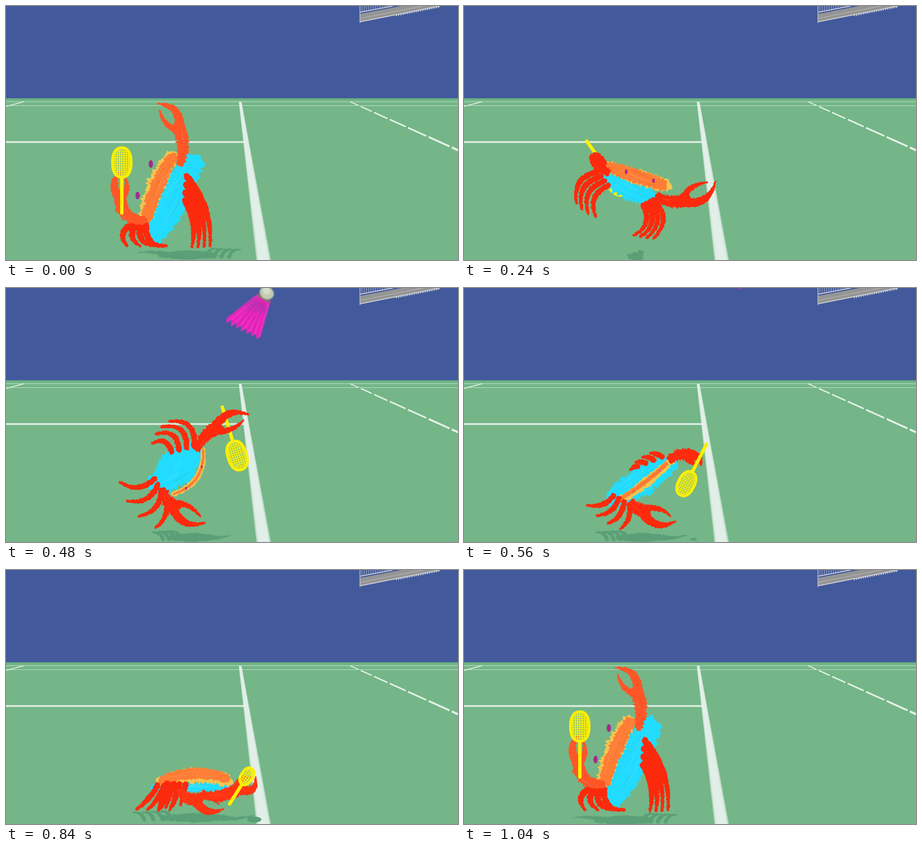
An HTML page with a canvas for the animation above (1080 ms loop, 800x450 px).

```html
<!DOCTYPE html>
<html lang="en">
<head>
<meta charset="utf-8">
<title>Crab smash</title>
<style>
  html, body { margin: 0; width: 100%; height: 100%; overflow: hidden; background: #74b687; }
  canvas { display: block; width: 800px; height: 450px; }
</style>
</head>
<body>
<canvas id="stage" width="800" height="450"></canvas>
<script>
const ctx = document.getElementById('stage').getContext('2d');
const LOOP = 1080, STEP = 40, HIT = 440, RAD = Math.PI / 180;
const RED = '#fc2a0d', YELLOW = '#fff000', SHADE = '#5a9f77', CHALK = '#e4f1e8';

// Key poses.
// left, right: first root, last root, first foot, last foot of four legs
// hand, claw: shoulder, wrist, tip;  belly, shell: both ends;  grip: middle of the racket
// bend: left legs, right legs, arm, pincer, shell
// skin: belly width, rim width, shell width, shell shift, shell trim, eye offset, eye size, tone
// bat: angle, size;  shade: x, half span, y, side of the fronds
const POSES = [
  { t: 0, order: 'front',
    left: [222, 387, 248, 389, 214, 425, 284, 425], right: [317, 345, 320, 302, 329, 427, 361, 425],
    hand: [243, 380, 202, 338, 206, 292], claw: [309, 278, 305, 215, 269, 173],
    belly: [329, 280, 264, 400], shell: [290, 269, 247, 374], grip: [205, 322],
    bend: [.28, -.1, -.25, -.22, .04], skin: [62, 33, 26, -3, 0, 24, 1, 1],
    bat: [-90, 28], shade: [324, 91, 441, 1] },
  { t: 160, order: 'back',
    left: [225, 350, 253, 352, 228, 420, 265, 425], right: [325, 338, 342, 325, 333, 416, 363, 411],
    hand: [240, 340, 221, 322, 253, 264], claw: [336, 308, 388, 281, 417, 220],
    belly: [346, 317, 232, 350], shell: [338, 277, 242, 333], grip: [240, 295],
    bend: [.23, -.32, -.2, -.2, 0], skin: [36, 40, 42, 0, .12, 3, 1, 0],
    bat: [-11, 27], shade: [275, 83, 442, 1] },
  { t: 360, order: 'middle',
    left: [306, 240, 286, 270, 242, 245, 247, 297], right: [287, 338, 318, 342, 262, 385, 294, 425],
    hand: [317, 254, 312, 200, 251, 179], claw: [312, 354, 333, 380, 395, 398],
    belly: [308, 332, 308, 268], shell: [328, 343, 331, 254], grip: [286, 188],
    bend: [.25, -.15, .08, .2, 0], skin: [57, 10, 0, 0, 0, 0, 0, 0],
    bat: [152, 29], shade: [344, 54, 447, -1] },
  { t: 480, order: 'middle',
    left: [333, 280, 293, 290, 290, 236, 259, 275], right: [263, 338, 280, 370, 202, 344, 265, 424],
    hand: [340, 283, 373, 248, 429, 224], claw: [280, 362, 297, 387, 352, 416],
    belly: [274, 345, 328, 296], shell: [297, 365, 349, 287], grip: [396, 254],
    bend: [.3, -.2, -.1, -.2, .19], skin: [68, 11, 5, 0, 0, 0, .4, 0],
    bat: [433, 28], shade: [328, 70, 442, -1] },
  { t: 640, order: 'front',
    left: [368, 318, 320, 340, 366, 352, 327, 370], right: [265, 395, 305, 397, 233, 425, 291, 428],
    hand: [392, 323, 424, 347, 402, 400], claw: [318, 398, 343, 406, 401, 411],
    belly: [262, 392, 392, 333], shell: [259, 380, 396, 313], grip: [422, 368],
    bend: [-.1, -.12, -.2, -.18, -.12], skin: [38, 23, 12, -4, -.3, 0, 0, 0],
    bat: [521, 21], shade: [299, 91, 442, -1] },
  { t: 840, order: 'front',
    left: [318, 380, 285, 378, 309, 416, 270, 425], right: [268, 382, 303, 382, 231, 424, 290, 425],
    hand: [350, 398, 413, 386, 442, 367], claw: [310, 395, 338, 407, 385, 423],
    belly: [263, 385, 400, 384], shell: [277, 376, 390, 373], grip: [411, 390],
    bend: [0, -.06, .12, .35, -.09], skin: [18, 27, 20, -4, 0, 0, 0, .25],
    bat: [662, 18], shade: [332, 107, 439, -1] }
];
POSES.push({ ...POSES[0], t: 1040, bat: [630, 28], shade: [285, 92, 443, 1] });
const LIMBS = ['left', 'right', 'hand', 'claw', 'belly', 'shell', 'grip'];
const TRAITS = ['bend', 'skin', 'bat', 'shade'];

const lerp = (a, b, u) => a + (b - a) * u;
const mix = (a, b, u) => a.map((v, i) => lerp(v, b[i], u));

let seed = 1;
const rnd = () => {
  seed = (seed * 16807) % 2147483647;
  return seed / 2147483647;
};

// The body turns clockwise all the time, about the middle of its shoulders
POSES.forEach((p, i) => {
  const [hx, hy] = p.hand, [cx, cy] = p.claw;
  p.mid = [(hx + cx) / 2, (hy + cy) / 2];
  p.turn = Math.atan2(hy - cy, hx - cx);
  while (i && p.turn < POSES[i - 1].turn) p.turn += Math.PI * 2;
});

function rotate(list, ang) {
  const c = Math.cos(ang), s = Math.sin(ang), out = [];
  for (let i = 0; i < list.length; i += 2) {
    out.push(list[i] * c - list[i + 1] * s, list[i] * s + list[i + 1] * c);
  }
  return out;
}
const shift = (list, x, y) => list.map((v, i) => v + (i % 2 ? y : x));
const local = (p, key) => rotate(shift(p[key], -p.mid[0], -p.mid[1]), -p.turn);

function poseAt(t) {
  let k = 0;
  while (k < POSES.length - 2 && t >= POSES[k + 1].t) k++;
  const a = POSES[k], b = POSES[k + 1], u = Math.min(1, (t - a.t) / (b.t - a.t));
  const mid = mix(a.mid, b.mid, u), turn = lerp(a.turn, b.turn, u);
  const pose = { order: (u < .5 ? a : b).order };
  for (const key of LIMBS) pose[key] = shift(rotate(mix(local(a, key), local(b, key), u), turn), ...mid);
  for (const key of TRAITS) pose[key] = mix(a[key], b[key], u);
  return pose;
}

function line(x0, y0, x1, y1, width, color) {
  ctx.beginPath();
  ctx.moveTo(x0, y0);
  ctx.lineTo(x1, y1);
  ctx.lineWidth = width;
  ctx.strokeStyle = color;
  ctx.stroke();
}

function poly(list, color) {
  ctx.beginPath();
  for (let i = 0; i < list.length; i += 2) ctx.lineTo(list[i], list[i + 1]);
  ctx.closePath();
  ctx.fillStyle = color;
  ctx.fill();
}

function ellipse(x, y, rx, ry, color) {
  ctx.beginPath();
  ctx.ellipse(x, y, rx, ry, 0, 0, 7);
  ctx.fillStyle = color;
  ctx.fill();
}

// Point on a bowed curve, moved sideways by off
function along([x0, y0, x1, y1], bend, u, off = 0) {
  const dx = x1 - x0, dy = y1 - y0, bow = 4 * bend * u * (1 - u), slope = 4 * bend * (1 - 2 * u);
  const tx = dx - dy * slope, ty = dy + dx * slope, d = Math.hypot(tx, ty) || 1;
  return [x0 + dx * u - dy * bow - ty / d * off, y0 + dy * u + dx * bow + tx / d * off, Math.atan2(ty, tx)];
}

// Crayon stroke with ragged edges
function tube(ends, bend, w, color, { rough = 1, from = 0, to = 1, streaks = 0 } = {}) {
  const half = u => (u < .5 ? lerp(w[0], w[1], u * 2) : lerp(w[1], w[2], u * 2 - 1)) / 2;
  const fuzz = () => (rnd() - .5) * 2 * rough;
  const n = Math.ceil(Math.hypot(ends[2] - ends[0], ends[3] - ends[1]) / 2) + 4, out = [];
  for (const dir of [1, -1]) {
    for (let i = 0; i <= n; i++) {
      const u = lerp(from, to, (dir > 0 ? i : n - i) / n);
      out.push(...along(ends, bend, u, dir * (half(u) + fuzz())).slice(0, 2));
    }
    const end = dir > 0 ? to : from, [x, y, ang] = along(ends, bend, end);
    for (let i = 1; i < 10; i++) {
      const th = ang + Math.PI * (dir * .5 - i / 10), r = half(end) + fuzz();
      out.push(x + Math.cos(th) * r, y + Math.sin(th) * r);
    }
  }
  poly(out, color);
  for (let j = 0; j < streaks; j++) {
    const f = rnd() * 1.6 - .8, s = lerp(from, to, rnd() * .6), e = Math.min(to, s + .3);
    const [ax, ay] = along(ends, bend, s, f * half(s)), [bx, by] = along(ends, bend, e, f * half(e));
    line(ax, ay, bx, by, 1.2, j % 2 ? 'rgba(255,255,255,.1)' : 'rgba(120,60,0,.07)');
  }
}

function court() {
  ctx.fillStyle = '#42599b';
  ctx.fillRect(0, 0, 800, 170);
  ctx.fillStyle = '#74b687';
  ctx.fillRect(0, 163.5, 800, 287);
  ctx.fillStyle = '#69b080';
  ctx.fillRect(0, 164, 800, 2);
  line(0, 169.5, 800, 169.5, 1, '#b9dcc5');
  line(0, 176.5, 800, 176.5, 1, '#b9dcc5');
  line(0, 178, 32, 169.5, 1.6, CHALK);
  line(0, 241, 424, 241, 3, CHALK);
  for (let soft = 5; soft >= 0; soft--) {
    const half = 8 + soft;
    poly([414.5 - half * .2, 170, 414.5 + half * .2, 170, 456 + half, 450, 456 - half, 450],
         'rgba(232,241,236,.38)');
  }
  const y = x => 169.5 + (x - 609) * .45;
  for (let x = 609, gap = 19, w = 1.8; x < 800; x += gap, gap += 4.4, w += .3) {
    line(x, y(x), x + gap - 4, y(x + gap - 4), w, CHALK);
  }
  net();
}

function net() {
  poly([627, 14, 700, 0, 765, 0, 627, 28], '#959595');
  for (let x = 630; x < 686; x += 4) line(x, 0, x, 11 - (x - 627) * .19, 1, '#aab2cc');
  line(627, 11, 685, 0, 1.5, '#d5d8e2');
  line(627, 22, 738, 0, 1.2, '#b5b5b5');
  line(627, 28, 768, 0, 1.6, '#d8d8d8');
  ctx.setLineDash([2, 2]);
  line(690, 17, 768, 1.5, 2.5, '#c9ccd8');
  ctx.setLineDash([]);
  line(626.5, 0, 626.5, 30, 1.5, '#b8bac4');
}

function shadow({ shade: [x, span, y, side], grip, bat: [deg, size] }) {
  const at = k => x + side * span * k;
  tube([at(-.55), y, at(.5), y], 0, [9, 17, 9], SHADE);
  tube([at(-.4), y, at(-1), y - 4], .05, [9, 6, 1], SHADE);
  for (let k = .55; k < 1.05; k += .15) {
    tube([at(k) - side * 20, y + 3, at(k), y - 14 + k * 5], -.2 * side, [7, 6, 2], SHADE, { rough: .6 });
  }
  // A racket close to the floor throws its own shade
  const head = grip[1] + Math.sin(deg * RAD) * size * 1.6;
  const r = Math.min(17, (head - 330) / 2.8);
  if (r > 2) ellipse(grip[0] + Math.cos(deg * RAD) * size * 1.6 + 13, y + 3, r, r * .42, SHADE);
}

function racket({ grip, bat: [deg, size] }) {
  const half = size * 1.6, wide = size * .64;
  ctx.save();
  ctx.translate(...grip);
  ctx.rotate(deg * RAD);
  ctx.lineCap = 'round';
  line(-half, 0, half - size, 0, 6, YELLOW);
  ctx.translate(half, 0);
  ctx.beginPath();
  for (let th = 0; th < 6.28; th += .13) {
    const c = Math.cos(th), s = Math.sin(th);
    ctx.lineTo(Math.sign(c) * Math.abs(c) ** .85 * (size - 2), Math.sign(s) * Math.abs(s) ** .85 * (wide - 1.5));
  }
  ctx.closePath();
  ctx.lineWidth = 5;
  ctx.strokeStyle = YELLOW;
  ctx.stroke();
  ctx.clip();
  for (let v = -28; v <= 28; v += 4) {
    line(v, -30, v, 30, 2, '#f4ec10');
    line(-30, v, 30, v, 2, '#f4ec10');
  }
  ctx.restore();
}

// Four legs fanned out between the first and the last one
function legs([ax, ay, bx, by, fx, fy, gx, gy], bend, weight) {
  const dx = gx - fx, dy = gy - fy, fan = .6 * Math.abs(dy) / Math.hypot(dx, dy);
  for (let i = 0; i < 4; i++) {
    const u = i / 3, out = fan * u * (1 - u);
    const foot = [fx + dx * u - dy * out, fy + dy * u + dx * out];
    tube([lerp(ax, bx, u), lerp(ay, by, u), ...foot], bend, [10 * weight, 9.5 * weight, 5], RED);
  }
}

// Arm with a long pincer and a shorter one facing it
function arm([x, y, wx, wy, tx, ty], bow, hook, color) {
  const dx = tx - wx, dy = ty - wy, d = Math.hypot(dx, dy), side = Math.sign(hook);
  const nx = -dy / d * side, ny = dx / d * side, gape = d * .1;
  tube([x, y, wx, wy], bow, [14, 21, 23], color, { rough: 2.4, streaks: 5 });
  tube([wx + nx * 4, wy + ny * 4, tx, ty], hook, [17, 13, 3], color);
  tube([wx - nx * 6, wy - ny * 6, wx + dx * .8 - nx * gape, wy + dy * .8 - ny * gape],
       -hook * .6, [12, 9, 3], color);
}

function shell({ shell: ends, bend, skin: [, rim, width, side, trim, look, eye] }) {
  const bow = bend[4];
  tube(ends, bow, [rim * .75, rim, rim * .75], '#f3c650', { rough: Math.min(4, rim / 8) });
  if (width > 1) {
    const [x, y, ang] = along(ends, bow, .5), [sx, sy] = along(ends, bow, .5, side);
    tube(shift(ends, sx - x, sy - y), bow, [width * .8, width, width * .8], '#ff7d35',
         { rough: Math.min(3, width / 10), from: Math.max(0, trim), to: 1 + Math.min(0, trim), streaks: width / 2 });
  }
  for (const u of [.22, .72]) {
    const [x, y] = along(ends, bow, u, look);
    if (eye > .1) ellipse(x, y, 3.8 * eye, 6.8 * eye, '#a52a8c');
  }
}

function crab(pose) {
  const { order, bend, belly, skin } = pose, width = skin[0], tone = skin[7];
  const color = `rgb(255,${lerp(42, 86, tone)},${lerp(13, 40, tone)})`;
  const edgeOn = skin[2] < 2;
  if (order === 'back') racket(pose);
  if (edgeOn) shell(pose);
  tube(belly, 0, [width * .66, width, width * .66], '#22dcff', { rough: Math.min(4.5, width / 10), streaks: 12 });
  if (!edgeOn) shell(pose);
  legs(pose.left, bend[0], 1 + tone * .15);
  legs(pose.right, bend[1], 1 + tone * .15);
  arm(pose.claw, .1, .22, color);
  if (order === 'middle') racket(pose);
  arm(pose.hand, bend[2], bend[3], color);
  if (order === 'front') racket(pose);
}

// Drops in cork first, then flies off the racket
function shuttle(t) {
  const n = (t - HIT) / STEP;
  if (n < -2 || n > 3) return;
  ctx.save();
  ctx.translate(440 + n * (n > 0 ? 22 : 8), 52 + n * (n > 0 ? -44 : 26));
  ctx.rotate((n > 0 ? 120 : -100) * RAD);
  ctx.filter = 'blur(1.2px)';
  const feathers = [10, -13];
  for (let v = -25; v <= 36; v += 10) feathers.push(74, v - 4, 80 + rnd() * 5, v, 75, v + 4);
  feathers.push(10, 13);
  poly(feathers, '#f52cc8');
  for (let v = -25; v <= 36; v += 10) {
    line(16, v * .35, 77, v + 2, 2 + rnd() * 2, '#d023a9');
    line(22, v * .4, 34 + rnd() * 16, v * .6, 1.6, '#8b45ae');
  }
  line(12, -13, 12, 13, 5, '#77705c');
  ellipse(1, 0, 11, 13, '#c3cbb0');
  ellipse(-2, 2, 6, 7, '#d8dec8');
  ctx.restore();
}

function draw(t) {
  let step = Math.floor((t + .01) / STEP) * STEP;
  if (step === 680) step = 640; // the landing is held for two steps
  seed = 4711 + step % 1040;
  court();
  const pose = poseAt(step);
  shadow(pose);
  crab(pose);
  shuttle(step);
}

const start = performance.now();
function tick() {
  draw((performance.now() - start) % LOOP);
  requestAnimationFrame(tick);
}
tick();
</script>
</body>
</html>
```
